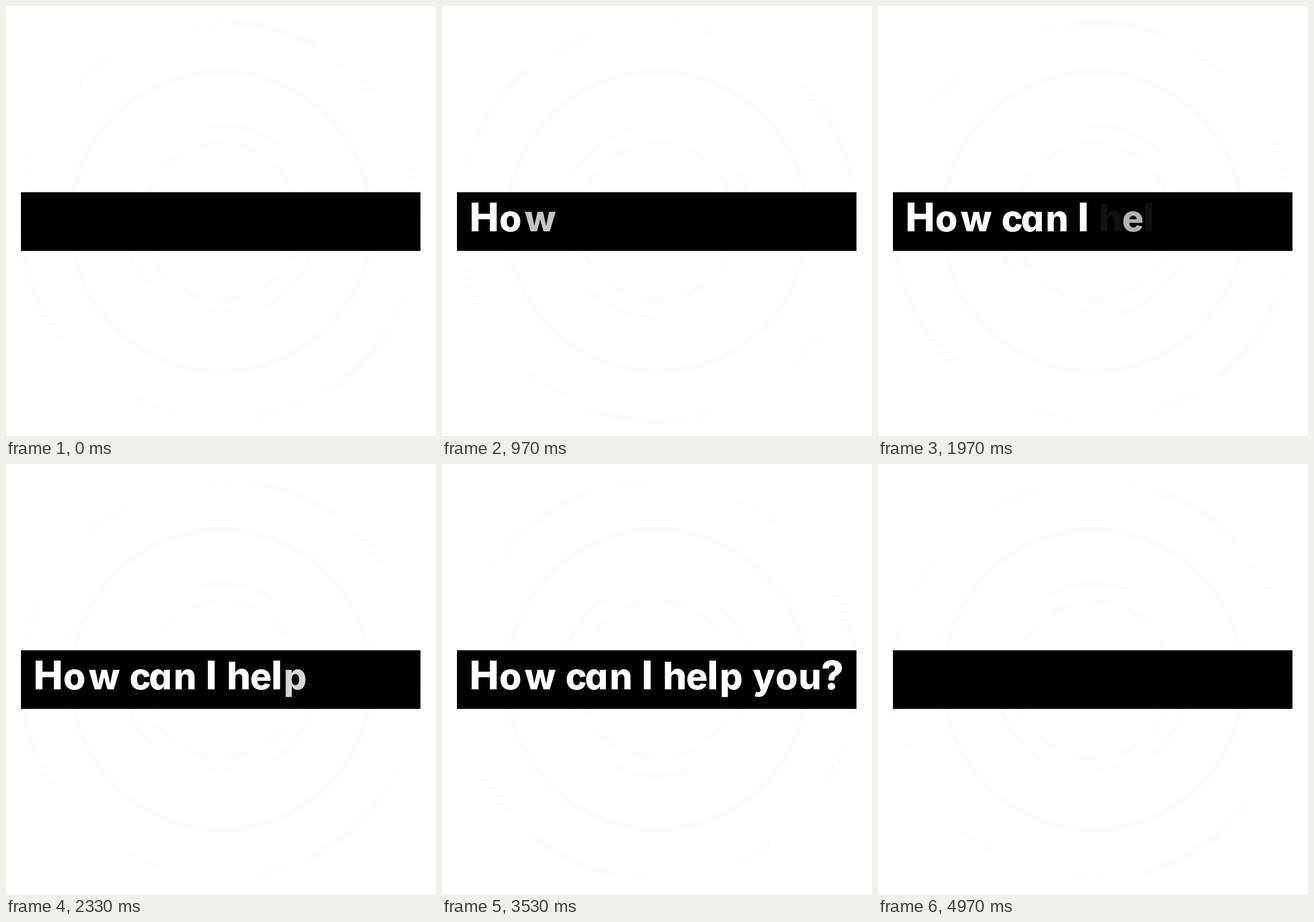
An HTML page with a canvas for the animation above (5010 ms loop, 748 by 748 pixels).

```html
<!DOCTYPE html>
<html lang="en">
<head>
<meta charset="utf-8">
<title>How can I help you?</title>
<style>
html, body { margin: 0; width: 100%; height: 100%; overflow: hidden; background: #fff; }
canvas, svg { position: absolute; left: 0; top: 0; width: 748px; height: 748px; }
text {
  font-family: Inter, Lato, sans-serif;
  font-weight: 800;
  font-feature-settings: "cv11";
  text-anchor: middle;
  fill: #fff;
}
</style>
</head>
<body>
<canvas id="stage" width="748" height="748"></canvas>
<svg id="line" viewBox="0 0 748 748"></svg>
<script>
const LOOP = 5010, FADE = 300, OUT = 3900, OUT_SCALE = 0.28;
const ctx = document.getElementById('stage').getContext('2d');
const svg = document.getElementById('line');
const rad = deg => deg * Math.PI / 180;
const clamp = v => Math.max(0, Math.min(1, v));

// letter, centre x, time it starts to appear
const letters = [
  ['H', 73.5, 620], ['o', 119, 495], ['w', 171, 740],
  ['c', 233.5, 1000], ['a', 268.5, 1080], ['n', 311.5, 1274],
  ['I', 357, 1376],
  ['h', 405, 1950], ['e', 443.5, 1760], ['l', 471, 1952], ['p', 503, 2080],
  ['y', 560, 2420], ['o', 599.5, 2680], ['u', 640, 2550], ['?', 679, 2800]
].map(([char, x, start]) => {
  const el = document.createElementNS('http://www.w3.org/2000/svg', 'text');
  el.textContent = char;
  el.setAttribute('x', x);
  el.setAttribute('y', 392);
  el.setAttribute('font-size', 'HI?l'.includes(char) ? 68.5 : char === 'h' ? 66 : 63);
  svg.appendChild(el);
  return { el, start };
});

// rotation of the outer dial: time, degrees
const turns = [[0, 46], [630, 80], [1400, 118], [1970, 158],
               [2670, 183], [3530, 237], [4970, 303], [5010, 305]];

function dialAngle(t) {
  const i = Math.max(1, turns.findIndex(k => k[0] > t));
  const [t0, a0] = turns[i - 1], [t1, a1] = turns[i];
  return a0 + (a1 - a0) * (t - t0) / (t1 - t0);
}

function arc(r, width, from, to) {
  ctx.lineWidth = width;
  ctx.beginPath();
  ctx.arc(0, 0, r, rad(from), rad(to));
  ctx.stroke();
}

function hatch(mid) {
  for (let i = -2; i <= 2; i++) {
    const a = rad(mid + i * 2.6), b = a + rad(2);
    ctx.lineWidth = 6;
    ctx.beginPath();
    ctx.moveTo(336 * Math.cos(a), 336 * Math.sin(a));
    ctx.lineTo(354 * Math.cos(b), 354 * Math.sin(b));
    ctx.stroke();
  }
}

function drawDial(t) {
  const turn = dialAngle(t);
  ctx.save();
  ctx.translate(374, 375);
  ctx.strokeStyle = '#fdfdfd';
  arc(277, 2, 0, 360);
  arc(261, 10, 0, 360);
  arc(125, 2, 0, 360);
  for (let k = 0; k < 3; k++) {
    const a = turn + k * 120;
    arc(347, 12, a - 13, a + 13);
    [26, 63, 102].forEach(d => hatch(a + d));
    arc(167, 7, 66 - a, 114 - a);
    arc(157, 3, 5 - a, 40 - a);
  }
  for (let k = 0; k < 12; k++) arc(136, 9, k * 30 - turn, k * 30 - turn + 16);
  ctx.restore();
}

function draw(t) {
  ctx.fillStyle = '#fff';
  ctx.fillRect(0, 0, 748, 748);
  drawDial(t);
  ctx.fillStyle = '#000';
  ctx.fillRect(26, 324, 695, 102);
  for (const { el, start } of letters) {
    const leave = OUT + (start - 495) * OUT_SCALE;
    const shown = clamp((t - start) / FADE) * (1 - clamp((t - leave) / 250));
    el.setAttribute('opacity', shown.toFixed(3));
  }
}

const begin = performance.now();
function tick() {
  draw((performance.now() - begin) % LOOP);
  requestAnimationFrame(tick);
}
tick();
</script>
</body>
</html>
```
